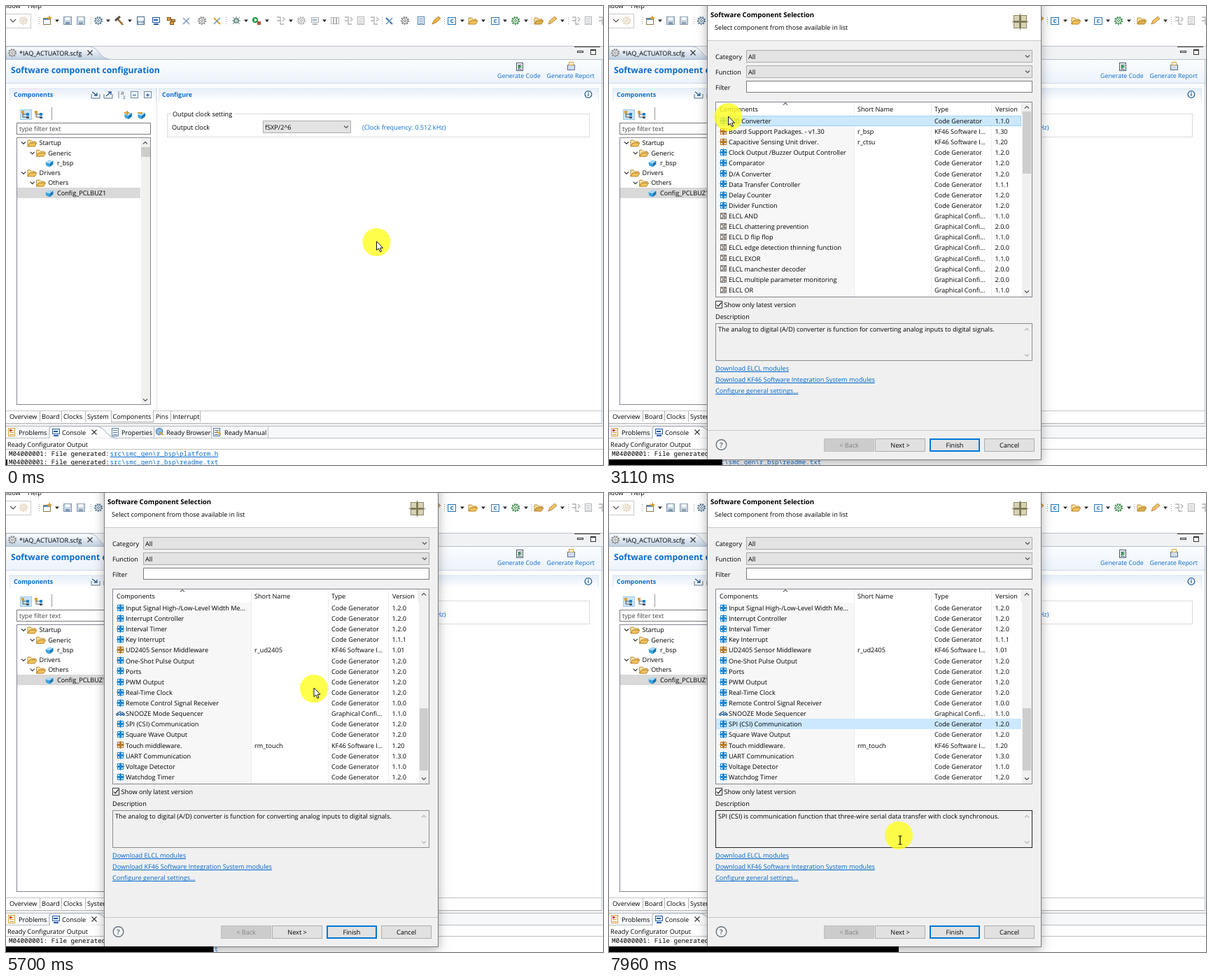
Animation, 853 px wide and 657 px high, one loop 7.99 s. Source, as an HTML page with a canvas:

```html
<!DOCTYPE html>
<html lang="en">
<head>
<meta charset="utf-8">
<title>Component selection</title>
<style>
  html, body { margin: 0; width: 100%; height: 100%; overflow: hidden; background: #fff; }
  canvas { display: block; }
</style>
</head>
<body>
<canvas id="stage" width="853" height="657"></canvas>
<script>
const ctx = document.getElementById('stage').getContext('2d');
ctx.textRendering = 'geometricPrecision';

const LOOP = 7990, DIALOG_AT = 2700, SELECT_AT = 7030;
const LINK = '#0a6cce', INK = '#000', GREY = '#b0b0b0', BLUE = '#1f86cf', GOLD = '#d9a032';

// ---------- drawing helpers ----------
function text(s, x, y, { color = INK, size = 9.15, bold = false, mono = false, align = 'left', underline = false } = {}) {
  const family = mono ? '"Noto Sans Mono", monospace' : '"Open Sans", sans-serif';
  ctx.font = `${bold ? 'bold ' : ''}${size}px ${family}`;
  ctx.textAlign = align;
  ctx.fillStyle = color;
  ctx.fillText(s, x, y + size * 0.36);
  if (underline) ctx.fillRect(x, Math.round(y + 4.4), ctx.measureText(s).width, 1);
}
function rect(x, y, w, h, fill, border) {
  if (fill) { ctx.fillStyle = fill; ctx.fillRect(x, y, w, h); }
  if (border) { ctx.strokeStyle = border; ctx.lineWidth = 1; ctx.strokeRect(x + .5, y + .5, w - 1, h - 1); }
}
function path(d, x, y, stroke, fill, width = 1) {
  const p = new Path2D(d);
  ctx.save();
  ctx.translate(x, y);
  if (fill) { ctx.fillStyle = fill; ctx.fill(p); }
  if (stroke) { ctx.strokeStyle = stroke; ctx.lineWidth = width; ctx.stroke(p); }
  ctx.restore();
}
function disc(x, y, r, fill, stroke, width = 1) {
  ctx.beginPath();
  ctx.arc(x, y, r, 0, 7);
  if (fill) { ctx.fillStyle = fill; ctx.fill(); }
  if (stroke) { ctx.strokeStyle = stroke; ctx.lineWidth = width; ctx.stroke(); }
}
function fade(y0, y1, top, bottom) {
  const g = ctx.createLinearGradient(0, y0, 0, y1);
  g.addColorStop(0, top);
  g.addColorStop(1, bottom);
  return g;
}
const chevron = (x, y, dir = 1, color = '#555', r = 3) =>
  path(`M${-r},${-dir * r / 2} L0,${dir * r / 2} L${r},${-dir * r / 2}`, x, y, color, null, 1.2);
const cross = (x, y) => path('M-3.5-3.5L3.5 3.5M3.5-3.5L-3.5 3.5', x, y, '#333', null, 1.1);

const icons = {
  caret: (x, y) => path('M-3,-1.5H3L0,2Z', x, y, null, '#222'),
  dots: (x, y) => { for (let i = -5; i < 7; i += 3) rect(x, y + i, 1, 1, '#999'); },
  page(x, y, c) {
    rect(x - 5, y - 6, 10, 12, '#f8fbff', c);
    for (let i = -3; i < 4; i += 3) rect(x - 3, y + i, 6, 1, c);
  },
  window(x, y, c) { rect(x - 6, y - 4, 11, 10, '#f8fbff', '#8b7a4c'); rect(x - 5, y - 3, 9, 2, '#5b8fc4'); path('M3,-7V-1M0,-4H6', x, y, c, null, 1.8); },
  floppy(x, y, c) { rect(x - 6, y - 6, 12, 12, '#c9d6e2', c); rect(x - 3, y - 5, 6, 4, '#fff'); rect(x - 3, y + 2, 6, 4, c); },
  gear(x, y, c) {
    ctx.setLineDash([2, 1.6]); disc(x, y, 5.2, null, c, 1.8); ctx.setLineDash([]);
    disc(x, y, 4, '#f4f4f4', c, 1); disc(x, y, 1.5, null, c);
  },
  bug(x, y, c) { path('M-5,-5L5,5M5,-5L-5,5M-6,0H6M0,-6V0', x, y, '#6d7c80'); disc(x, y, 3.2, '#b9d7ba', c, 1.3); },
  screen(x, y, c) { rect(x - 5, y - 5, 11, 8, '#e7f1fb', c); rect(x - 3, y - 2, 6, 2, c); rect(x - 3, y + 4, 7, 2, c); },
  blocks(x, y, c) { rect(x - 6, y - 5, 6, 5, c, '#785016'); rect(x, y - 2, 6, 4, c, '#785016'); rect(x - 2, y + 1, 6, 5, c, '#785016'); },
  hammer(x, y, c) { path('M5,6L-2,-2', x, y, c, null, 2.6); path('M-6,0L1,-6', x, y, '#5b5146', null, 3); },
  wrench(x, y, c) { path('M-5,-4L4,5', x, y, c, null, 2.2); path('M-5,5L4,-4', x, y, '#6f9ac4', null, 1.6); },
  pencil(x, y, c) { path('M-6,5L-4,0L3,-6L6,-3L-1,3Z', x, y, '#b58a45', c); },
  folder(x, y, c) { path('M-6,5V-4H-2L0,-2H5V0H-3Z', x, y, '#b8852a', '#ffe9a8'); path('M-6,5L-3,0H7L4,5Z', x, y, '#b8852a', c); },
  run(x, y, c) { disc(x - 2, y - 1, 4.2, c); path('M-3,-3.5V1.5L1,-1Z', x, y, null, '#fff'); rect(x + 1, y + 1, 5, 5, '#b5523c'); },
  letter(x, y, c) { rect(x - 6, y - 5, 12, 11, '#e9f2fb', c); text('c', x, y, { color: c, bold: true, size: 9, align: 'center' }); },
  bits(x, y, c) { rect(x - 5, y - 6, 11, 12, '#fff', c); text('010', x + .5, y + 2, { color: c, bold: true, size: 5.5, align: 'center' }); },
  steps(x, y, c) { path('M-5,-5H0V5H5M-5,0H0M3,-5L6,-2L3,1', x, y, c, null, 1.3); },
  bars(x, y, c) { for (const i of [-6, -2, 2]) rect(x + i, y - 5, 4, 10, null, c); },
  cube(x, y) {
    path('M-6,-1L0,1V6L-5,4Z', x, y, null, '#35a3e3');
    path('M-6,-1L-1,-4L5,-3L0,1Z', x, y, null, '#a6dafa');
    path('M0,1L5,-3V2L0,6Z', x, y, null, '#1677b8');
  },
  quad(x, y, c) {
    for (const i of [-4, 1]) for (const j of [-4, 1]) rect(x + i, y + j, 4, 4, c);
    rect(x - 5, y, 11, 1, c); rect(x, y - 5, 1, 11, c);
    for (const i of [-3, 2]) for (const j of [-3, 2]) rect(x + i, y + j, 2, 2, '#e3f1fb');
  },
  logic(x, y) { rect(x - 4, y - 4, 9, 9, '#fff', '#77706a'); path('M-3,-2H0V3H-3M2,-3V4M2,-2H4M2,2H4', x, y, '#4b4038'); },
  states(x, y) { path('M-5,2H6M-3,2V-1H4V2M0,-1V-3', x, y, '#2d5f96', null, 1.2); for (const i of [-4, 1, 5]) disc(x + i, y + 2, 1.5, '#6fa3d6', '#2d5f96'); },
};

const toolbar = [
  ['dots', 47], ['window', 59, GOLD], ['caret', 73], ['floppy', 88, '#7d97b0'], ['floppy', 107, '#8fa1b3'], ['dots', 121],
  ['gear', 132, '#56799a'], ['caret', 146], ['hammer', 162, '#a36a2c'], ['caret', 177], ['bits', 192, '#45678c'],
  ['screen', 214, '#2659a5'], ['blocks', 236, '#e0a044'], ['wrench', 258, '#a9bacb'], ['gear', 280, '#8a8a8a'], ['wrench', 302, GOLD],
  ['dots', 314], ['bug', 329, '#4d6f7c'], ['caret', 343], ['run', 358, '#2d9a4b'], ['caret', 373], ['steps', 392, GREY], ['caret', 407],
  ['gear', 422, GREY], ['screen', 441, GREY], ['caret', 455], ['bars', 470, GREY], ['steps', 489, GREY], ['page', 507, GREY],
  ['steps', 526, GREY], ['dots', 537], ['wrench', 548, '#4478aa'], ['gear', 570, '#808080'], ['page', 593, '#4e7fad'], ['pencil', 615, '#efb13c'],
  ['dots', 626], ['letter', 637, '#2675b3'], ['caret', 652], ['folder', 667, '#f2c25a'], ['caret', 682], ['letter', 699, '#3c7bb8'],
  ['caret', 713], ['gear', 728, '#388a48'], ['caret', 743], ['dots', 750], ['folder', 761, '#d9b050'], ['pencil', 781, '#f2c265'],
  ['caret', 795], ['dots', 803], ['steps', 814, GREY], ['page', 832, GREY], ['steps', 852, GREY],
];

// ---------- main window ----------
function drawToolbar() {
  text('ndow', -3, 0); text('Help', 31, 0);
  rect(-2, 11, 38, 21, '#fff', '#c9c9c9');
  chevron(10, 21, 1, '#555', 4);
  icons.gear(25, 21, '#e4d4b4');
  for (const [kind, x, color] of toolbar) icons[kind](x, 21, color);
}

function drawEditor(filterHot) {
  rect(0, 57, 853, 20, '#f1f2f4');
  rect(0, 57, 853, 1, '#bcc3cc');
  path('M0,58H118C134,58 132,76 150,76.5H0Z', 0, 0, '#a9b6c6', fade(58, 77, '#fff', '#bdcee2'));
  rect(0, 76, 853, 1, '#b2c0d1');
  icons.gear(9, 67, '#888');
  text('*IAQ_ACTUATOR.scfg', 19, 67.5);
  cross(120, 67);
  rect(812, 58, 37, 1, '#333');
  rect(816, 64, 9, 3, '#fff', '#333');
  rect(835, 62, 8, 8, '#fff', '#333'); rect(835, 62, 8, 2, '#333');

  rect(0, 77, 853, 33, fade(77, 110, '#fbfdff', '#edf3fb'));
  rect(0, 110, 853, 1, '#cbd8e8');
  text('Software component configuration', 7, 92, { color: LINK, bold: true, size: 12.2 });
  icons.page(734, 87, '#456'); path('M-2,-3V3L3,0Z', 734, 87, null, '#2d9a4b');
  rect(802, 84, 11, 8, '#cfdcec', '#5b7694'); rect(804, 80, 7, 5, '#fff', GOLD);
  text('Generate Code', 702, 100, { color: LINK, size: 8.85 });
  text('Generate Report', 772.5, 100, { color: LINK, size: 8.85 });

  for (const [x, w, title] of [[5, 209, 'Components'], [218, 628, 'Configure']]) {
    rect(x, 117, w, 19, fade(117, 136, '#e4edf8', '#fff'));
    rect(x, 117, 1, 19, '#dbe6f4'); rect(x + w, 117, 1, 19, '#dbe6f4');
    text(title, x + (x > 9 ? 5 : 6), 126.5, { color: LINK, bold: true, size: 8.9 });
  }
  rect(215, 117, 1, 462, '#e2e2e2');
  for (const x of [128, 146]) {
    path('M-6,-1V5H6V-1', x, 127, '#5f7488', '#eef3f8');
    path(x < 140 ? 'M-5,-4L2,1M-2,1H2V-3' : 'M-3,2L4,-4M0,-4H4V0', x, 127, '#24588d', null, 1.3);
  }
  text('a', 164, 124, { color: '#555', size: 8 }); text('z', 167, 130, { color: LINK, size: 8 }); path('M0,-5V5', 161, 127, '#888');
  for (const x of [183, 202]) {
    rect(x - 5, 122, 11, 10, '#f8fbff', '#6d87a5'); rect(x - 2, 127, 5, 1, '#1e4f91');
    if (x > 190) rect(x, 125, 1, 5, '#1e4f91');
  }
  disc(832, 126.5, 4.8, '#fff', '#1d5f9e', 1.3); text('i', 832, 126.5, { color: '#1d4e86', bold: true, size: 8, align: 'center' });

  rect(20, 148, 17, 15, '#cce4f7', '#9ccbed');
  for (const x of [28, 47]) {
    path('M-4,-4V4H1M-4,0H1', x, 155, '#555');
    rect(x - 6, 150, 4, 4, GOLD); rect(x + 1, 153, 4, 4, BLUE); rect(x + 1, 158, 4, 3, '#4e5e70');
  }
  rect(65, 145, 1, 18, '#999');
  for (const x of [174, 193]) { icons.cube(x + 1, 156); rect(x - 5, 152, 7, 2, GOLD); if (x < 180) rect(x - 2, 150, 2, 7, GOLD); }

  rect(15, 167, 192, 17, '#fff', filterHot ? '#222' : '#7a7a7a');
  text('type filter text', 19, 176, { color: '#444' });
  rect(15, 188, 192, 383, '#fff', '#828790');
  rect(193, 189, 13, 381, '#f0f0f0');
  rect(193, 202, 13, 14, '#cdcdcd');
  chevron(199, 196, -1); chevron(199, 564);
  rect(16, 260, 176, 15, '#d9d9d9');
  const tree = [['Startup', 0], ['Generic', 1], ['r_bsp', 2], ['Drivers', 0], ['Others', 1], ['Config_PCLBUZ1', 2]];
  tree.forEach(([label, depth], i) => {
    const y = 196 + i * 14.3, x = 25 + depth * 12.7;
    if (depth < 2) { chevron(x, y, 1, '#333', 3); icons.folder(x + 12, y, '#f2c25a'); } else icons.cube(x + 12, y);
    text(label, x + 22.5, y);
  });

  rect(230, 154, 604, 34, null, '#dcdcdc');
  rect(235, 150, 91, 9, '#fff');
  text('Output clock setting', 238, 154.5); text('Output clock', 237, 173.5);
  rect(367, 164, 126, 18, '#e3e3e3', '#adadad');
  text('fSXP/2^6', 370, 173.5); chevron(486, 173);
  text('(Clock frequency: 0.512 kHz)', 509, 173.5, { color: LINK });

  rect(0, 579, 851, 1, '#c4c4c4');
  rect(150, 579, 61, 17, '#fff', '#aaa'); rect(151, 579, 59, 1, '#fff');
  [['Overview', 5, 48], ['Board', 51, 79], ['Clocks', 82, 113], ['System', 116, 150], ['Components', 152.5, 210], ['Pins', 214, 235], ['Interrupt', 238, 277]]
    .forEach(([label, x, end]) => { text(label, x, 587.5); rect(end, 580, 1, 15, '#b5b5b5'); });
  rect(0, 597, 852, 1, '#b2b2b2'); rect(851, 77, 1, 521, '#b8c2ce');
}

function drawConsole() {
  rect(0, 598, 853, 4, '#f0f0f0');
  rect(0, 601, 853, 18, '#f7f8fa');
  rect(0, 601, 853, 1, '#b9bec6'); rect(0, 618, 853, 1, '#b9bec6');
  path('M62,619V605Q62,601.5 66,601.5H128C144,602 142,618 158,618.5', 0, 0, '#9aa5b2', '#fff');
  icons.page(8, 610, GOLD); rect(5, 606, 3, 3, '#c83c32'); text('Problems', 18, 610.5);
  icons.screen(71, 610, '#2659a5'); text('Console', 80, 610.5); cross(126, 610);
  icons.page(156, 610, '#587da3'); text('Properties', 165, 610.5);
  disc(219, 609, 4.8, '#8abce4', '#44729e'); path('M0,0L6,4', 219, 610, GOLD, null, 2); text('Ready Browser', 229, 610.5);
  icons.page(301, 610, '#57799a'); path('M0,0L6,4', 301, 609, GOLD, null, 2); text('Ready Manual', 312, 610.5);
  for (const x of [211, 293, 374]) rect(x, 602, 1, 16, '#b9bec6');
  rect(0, 619, 853, 38, '#fff');
  text('Ready Configurator Output', 2, 627.5);
  rect(0, 634, 853, 1, '#bdbdbd');
  ['platform.h', 'readme.txt'].forEach((file, i) => {
    const y = 641 + i * 12, style = { mono: true, size: 9.23 };
    text('M04000001: File generated:', 4, y, style);
    text('src\\smc_gen\\r_bsp\\' + file, 148.5, y, { ...style, color: LINK, underline: true });
  });
}

// ---------- dialog ----------
// kind | name | short name | version
const components = `c|A/D Converter||1.1.0
s|Board Support Packages. - v1.30|r_bsp|1.30
s|Capacitive Sensing Unit driver.|r_ctsu|1.20
c|Clock Output /Buzzer Output Controller||1.2.0
c|Comparator||1.2.0
c|D/A Converter||1.2.0
c|Data Transfer Controller||1.1.1
c|Delay Counter||1.2.0
c|Divider Function||1.2.0
g|ELCL AND||1.1.0
g|ELCL chattering prevention||2.0.0
g|ELCL D flip flop||1.1.0
g|ELCL edge detection thinning function||2.0.0
g|ELCL EXOR||1.1.0
g|ELCL manchester decoder||2.0.0
g|ELCL multiple parameter monitoring||2.0.0
g|ELCL OR||1.1.0
g|ELCL selector||1.1.0
g|ELCL slave select pin function||2.0.0
g|ELCL Through||1.1.0
c|External Event Counter||1.2.0
s|GT2046 Sensor Middleware|r_gt2046|1.00
s|GT3058 Sensor Middleware|r_gt3058|1.10
s|GT4000 Sensor Middleware|r_gt4000|1.00
s|KW500x Sensor Middleware|r_kw500x|1.21
s|KW500x Sensor Middleware|r_kw600x|1.00
c|IIC Communication (Master mode)||1.3.0
c|IIC Communication (Slave mode)||1.2.0
s|IIC Communication Driver Interface Mid...|r_comms_i2c|1.10
c|Input Pulse Interval Measurement||1.2.0
c|Input Signal High-/Low-Level Width Me...||1.2.0
c|Interrupt Controller||1.2.0
c|Interval Timer||1.2.0
c|Key Interrupt||1.1.1
s|UD2405 Sensor Middleware|r_ud2405|1.01
c|One-Shot Pulse Output||1.2.0
c|Ports||1.2.0
c|PWM Output||1.2.0
c|Real-Time Clock||1.2.0
c|Remote Control Signal Receiver||1.0.0
z|SNOOZE Mode Sequencer||1.1.0
c|SPI (CSI) Communication||1.2.0
c|Square Wave Output||1.2.0
s|Touch middleware.|rm_touch|1.20
c|UART Communication||1.3.0
c|Voltage Detector||1.1.0
c|Watchdog Timer||1.2.0`.split('\n').map(line => line.split('|'));

const kinds = {
  c: ['Code Generator', 'quad', BLUE],
  s: ['KF46 Software I...', 'quad', '#b87a2a'],
  g: ['Graphical Confi...', 'logic'],
  z: ['Graphical Confi...', 'states'],
};
const ROW = 15.125, ROWS_TOP = 157, VISIBLE = 17;
const wheelTimes = [4140, 4200, 4270, 4340, 4560, 4720, 4950, 5050, 5150, 5280];

function button(x, label, { disabled, primary } = {}) {
  rect(x, 619, 72, 19, disabled ? '#ccc' : '#e1e1e1', disabled ? '#bfbfbf' : '#adadad');
  if (primary) { ctx.strokeStyle = '#0078d7'; ctx.lineWidth = 2; ctx.strokeRect(x + 1, 620, 70, 17); }
  text(label, x + 36, 629, { align: 'center', color: disabled ? '#838383' : INK });
}

function drawTable(t, pointer) {
  const offset = 3 * wheelTimes.filter(w => t >= w).length;
  const selected = t < SELECT_AT ? 0 : 41;
  const hovering = t < wheelTimes[0] || t > 5760;
  const over = pointer.y > ROWS_TOP && pointer.y < 414 ? offset + Math.floor((pointer.y - 1 - ROWS_TOP) / ROW) : -1;

  rect(152, 137, 453, 280, '#fff', '#828790');
  rect(153, 157, 197, 259, '#f7f7f7');
  for (const x of [350, 460, 546]) rect(x, 138, 1, 278, '#ececec');
  rect(589, 138, 1, 18, '#e5e5e5');
  chevron(252, 140, -1, '#666', 3);
  [['Components', 158], ['Short Name', 355], ['Type', 465], ['Version', 552]].forEach(([s, x]) => text(s, x, 147.5));

  components.slice(offset, offset + VISIBLE).forEach(([kind, name, short, version], i) => {
    const top = Math.round(ROWS_TOP + i * ROW), y = 164.7 + i * ROW, row = offset + i;
    const hovered = hovering && row === over;
    if (row === selected) rect(153, top, 436, 15, '#cce8ff', hovered ? '#99d1ff' : null);
    else if (hovered) rect(153, top, 436, 15, '#e5f3ff');
    const [type, icon, color] = kinds[kind];
    icons[icon](163, Math.round(y - 1), color);
    text(name, 171, y); text(short, 355, y); text(type, 465, y); text(version, 551.5, y);
  });

  rect(590, 138, 14, 278, '#f0f0f0');
  rect(591, 151 + offset * 5.24, 12, 89, '#cdcdcd');
  chevron(597, 145, -1); chevron(597, 409);
}

function drawDialog(t, pointer) {
  ctx.save();
  ctx.shadowColor = 'rgba(0,0,0,.3)'; ctx.shadowBlur = 14; ctx.shadowOffsetY = 4;
  rect(140, -20, 478, 670, '#f0f0f0');
  ctx.restore();
  rect(140, -1, 478, 651, '#f0f0f0', '#7d7d7d');
  rect(141, 0, 476, 49, '#fff'); rect(141, 49, 476, 1, '#c8c8c8');
  text('Software Component Selection', 145, 12.5, { bold: true, size: 9.65 });
  text('Select component from those available in list', 151, 31);
  for (const x of [578, 588]) for (const y of [13, 23]) rect(x, y, 9, 9, '#d6d2b5', '#8c8663');
  rect(576, 22, 23, 1, '#77714f'); rect(587, 11, 1, 23, '#77714f');

  [['Category', 72], ['Function', 94]].forEach(([label, y]) => {
    text(label, 152, y + .5);
    rect(196, y - 9, 409, 18, '#e3e3e3', '#adadad');
    text('All', 199, y + .5); chevron(598, y);
  });
  text('Filter', 152, 116.5);
  rect(196, 107, 409, 17, '#fff', '#7a7a7a');

  drawTable(t, pointer);

  rect(152, 422, 10, 11, '#fff', '#333'); path('M-3,0L-1,2.5L3.5,-3', 157, 427.5, '#222', null, 1.2);
  text('Show only latest version', 164.5, 428); text('Description', 152, 444.5);
  rect(152, 454, 453, 54, '#f0f0f0', pointer.y > 454 ? '#222' : '#8c8c8c');
  chevron(597, 463, -1, '#b5b5b5'); chevron(597, 500, 1, '#b5b5b5');
  text(t < SELECT_AT
    ? 'The analog to digital (A/D) converter is function for converting analog inputs to digital signals.'
    : 'SPI (CSI) is communication function that three-wire serial data transfer with clock synchronous.', 156, 463);
  ['Download ELCL modules', 'Download KF46 Software Integration System modules', 'Configure general settings...']
    .forEach((s, i) => text(s, 152, 518.5 + i * 16, { color: '#0066cc', underline: true }));

  rect(141, 607, 476, 1, '#c8c8c8');
  disc(160.5, 628, 7.3, '#f6f6f6', '#687480', 1.4);
  text('?', 160.5, 628, { align: 'center', bold: true, size: 10, color: '#687480' });
  button(307, '< Back', { disabled: true }); button(380, 'Next >');
  button(458, 'Finish', { primary: true }); button(536, 'Cancel');
}

// ---------- pointer ----------
const ease = {
  in: k => k * k,
  out: k => 1 - (1 - k) ** 2,
  both: k => k * k * (3 - 2 * k),
};
// time, x, y, easing towards this point
const route = [
  [0, 529.5, 338], [850, 529.5, 338, 'both'], [1640, 230, 248, 'in'], [2200, 171, 163, 'out'], [2400, 170.5, 159, 'both'],
  [3290, 170.5, 159, 'both'], [4060, 440, 280, 'both'], [5740, 440, 280, 'both'], [6540, 285, 327, 'both'],
  [7380, 285.5, 328, 'both'], [7940, 414, 490, 'both'], [LOOP, 414, 490, 'both'],
];
function pointerAt(t) {
  const i = route.findIndex(p => p[0] > t);
  const [t0, x0, y0] = route[i - 1], [t1, x1, y1, how] = route[i];
  const k = ease[how]((t - t0) / (t1 - t0));
  return { x: x0 + (x1 - x0) * k, y: y0 + (y1 - y0) * k };
}
function drawPointer(t, { x, y }) {
  disc(x, y, 20, 'rgba(255,255,30,.8)');
  const clicking = [2420, SELECT_AT].some(c => t >= c && t < c + 230);
  if (clicking) disc(x, y - 1, 8.3, null, '#f4511e', 2.8);
  if (t > 2050 && t < DIALOG_AT) {
    path('M0,1Q1.2,-1 2.4,1V6L8,7.4Q9.6,8 9.3,10L8,16.5H1.8L-4,10Q-3.4,7.8 0,10Z', x - 1, y - 1.5, '#111', '#fff', 1.1);
  } else if (y > 456) {
    path('M-2.5,-6H2.5M0,-6V6M-2.5,6H2.5', x + 2, y + 7, '#111', null, 1.2);
  } else {
    path('M0,0V12.5L2.9,10L5,14.8L7,14L5,9.3H9Z', x, y - 1, '#111', '#fff', 1);
  }
}

function draw(now) {
  const t = now % LOOP, pointer = pointerAt(t);
  rect(0, 0, 853, 657, '#fff');
  drawToolbar();
  drawEditor(t > 2050 && t < DIALOG_AT);
  drawConsole();
  if (t >= DIALOG_AT) drawDialog(t, pointer);
  drawPointer(t, pointer);
  rect(0, 649, Math.max(2, t * .052), 8, '#000');
  requestAnimationFrame(draw);
}
requestAnimationFrame(draw);
</script>
</body>
</html>
```
